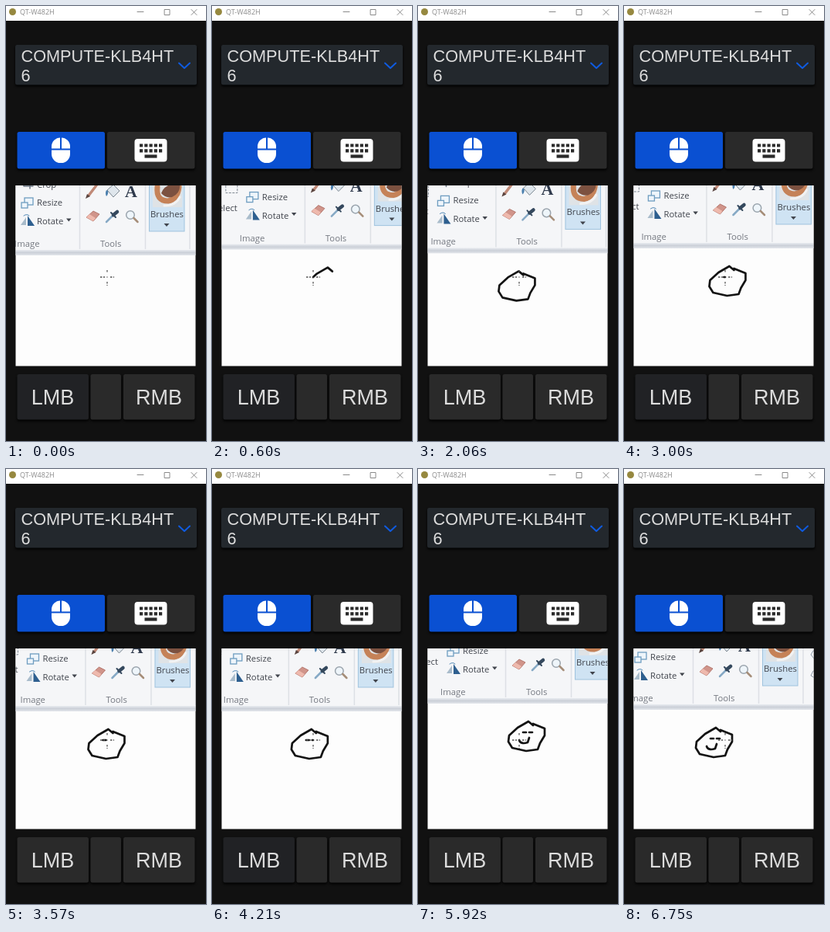
Recreate the animation shown at these times as an HTML page. Size 259x560 px, loop 6.77 s.

```html
<!DOCTYPE html>
<html lang="en">
<head>
<meta charset="utf-8">
<title>Remote mouse</title>
<style>
  html, body { margin: 0; width: 100%; height: 100%; overflow: hidden; background: #111; }
  svg { display: block; width: 100vw; height: 100vh; }
  .ui { font-family: "Liberation Sans", Arial, sans-serif; fill: #dcdcdc; }
  .ribbon { font: 11.3px "Open Sans", "Noto Sans", sans-serif; fill: #41454d; filter: blur(.6px); }
  .group { fill: #747880; }
  .button { fill: #2a2a2a; filter: drop-shadow(0 2px 1.5px #000); }
  .button.on { fill: #0a50d2; }
  .button.held { fill: #212225; }
  .line { fill: none; stroke-linecap: round; stroke-linejoin: round; }
  .ink { stroke: #131313; stroke-width: 2.7; filter: blur(.3px); }
</style>
</head>
<body>
<svg viewBox="0 0 259 560">
  <defs>
    <clipPath id="lens"><rect x="12.500" y="231" width="233" height="232.500"/></clipPath>
    <linearGradient id="edge" x2="0" y2="1">
      <stop offset="0" stop-color="#e8ebf0"/>
      <stop offset=".5" stop-color="#cbd0d8"/>
      <stop offset="1" stop-color="#e3e6eb"/>
    </linearGradient>
  </defs>
  <rect width="259" height="560" fill="#111"/>

  <!-- window bar -->
  <rect width="259" height="19" fill="#fff"/>
  <circle cx="8.500" cy="7.500" r="4.500" fill="#96883f"/>
  <text x="18" y="11" font-family="Open Sans, sans-serif" font-size="9" fill="#8a8a8a">QT-W482H</text>
  <path class="line" stroke="#8a8a8a" d="M170 7.500h8M205.500 4.500h6.500v7h-6.500zM240 4.500l7 7m0-7l-7 7"/>

  <!-- device list -->
  <rect class="button" x="12" y="50" width="235" height="51.500" rx="2.500" style="fill:#23282d"/>
  <g class="ui" font-size="21.7">
    <text x="19.500" y="71.500">COMPUTE-KLB4HT</text>
    <text x="19.500" y="96.500">6</text>
  </g>
  <path class="line" stroke="#0f5be0" stroke-width="2" d="M224 73.500l7 6.500l7-6.500"/>

  <!-- mode buttons -->
  <rect class="button on" x="14.500" y="162" width="113.500" height="47.500" rx="2.500"/>
  <rect class="button" x="131" y="162" width="113.500" height="47.500" rx="2.500"/>
  <rect x="59" y="169.500" width="24" height="32.500" rx="11.500" fill="#fff"/>
  <path d="M59 184.500h24M71 169v15" stroke="#0a50d2" stroke-width="2"/>
  <rect x="166.500" y="171" width="42" height="29.500" rx="4" fill="#fff"/>
  <g stroke="#2a2a2a" stroke-width="4.200">
    <path d="M173 179.500h29.200M173 186.300h29.200" stroke-dasharray="4.200 2.050"/>
    <path d="M179.500 193.500h16"/>
  </g>

  <!-- magnified desktop -->
  <g clip-path="url(#lens)">
    <rect x="12" y="230" width="234" height="234" fill="#fdfdfd"/>
    <g id="desk">
      <g class="ribbon">
        <rect x="-40" y="180" width="340" height="134" fill="#f5f6f8"/>
        <rect x="-40" y="313" width="340" height="7" fill="url(#edge)"/>
        <path d="M95.500 190v122M180.500 190v122M238 190v122" stroke="#dde0e5" stroke-width="1.500"/>
        <text x="8" y="270" text-anchor="end">Select</text>
        <rect x="-7" y="234" width="15" height="13" fill="none" stroke="#7d8791" stroke-dasharray="3 1.500"/>
        <text x="40" y="233">Crop</text>
        <path class="line" stroke="#6b7683" stroke-width="1.500" d="M23 219v12h12M20 223h11v11"/>
        <g fill="#eef5fb" stroke="#6f9dc0" stroke-width="1.300">
          <rect x="24" y="246" width="11" height="9"/>
          <rect x="20" y="252" width="8" height="7"/>
        </g>
        <text x="40" y="256">Resize</text>
        <path d="M26 281h-7l7-10z" fill="#a9bccb"/>
        <path d="M28 269v13h9z" fill="#2e5f8f"/>
        <path class="line" stroke="#4d86b5" d="M23 269q4-3 7 0"/>
        <text x="40" y="280">Rotate</text>
        <path d="M78 272.500h6.500l-3.250 4z"/>
        <g class="group">
          <text x="11" y="309">Image</text>
          <text x="122" y="309">Tools</text>
        </g>

        <!-- drawing tools -->
        <path class="line" stroke="#c08a78" stroke-width="3.500" d="M107 243l10-13"/>
        <path d="M103 247l2-6l4 3z" fill="#5a4540"/>
        <path d="M131 236l8-7l8 8l-8 8z" fill="#dfe6ec" stroke="#7c8791"/>
        <path d="M130 236q-2 4 0 8q3-3 2-7z" fill="#4a7fae"/>
        <text x="154" y="245" font-family="Liberation Serif, serif" font-size="22" font-weight="bold" fill="#2f3a4c">A</text>
        <path d="M104 271l9-8l8 4l-8 9z" fill="#d0948a" stroke="#b4786f"/>
        <path d="M104 271l4-4l8 5l-3 4z" fill="#eeb9ad"/>
        <path class="line" stroke="#86a9c5" stroke-width="2.500" d="M130 277l9-9"/>
        <path class="line" stroke="#34485d" stroke-width="4.500" d="M139 268l5-4"/>
        <path class="line" stroke="#34485d" stroke-width="2" d="M136 265l6 6"/>
        <circle cx="161" cy="268" r="5.300" fill="#eef5fa" stroke="#9aa4ad" stroke-width="1.500"/>
        <path class="line" stroke="#a58d78" stroke-width="2.500" d="M165.500 272l5 5"/>

        <!-- brush picker -->
        <rect x="185.500" y="200" width="45.500" height="89" fill="#cfe3f3" stroke="#9fc3de"/>
        <rect x="190" y="212" width="38" height="46" fill="#dfe3e6"/>
        <path class="line" stroke="#c58258" stroke-width="7" d="M196 232q-2 18 14 18q12-2 14-18"/>
        <path d="M201 240q4-12 24-14q2 14-10 19q-8 2-14-5z" fill="#7c5140"/>
        <path class="line" stroke="#f2f2f2" stroke-width="3" d="M205 256q15 0 20-11"/>
        <text x="187" y="271">Brushes</text>
        <path d="M204.500 279h7l-3.500 4z"/>
        <path class="line" stroke="#8b98a5" d="M256 244h-5l-3 5l4 5M256 270h-5l-3 6l5 3"/>
      </g>

      <!-- drawing, in the order of the pen -->
      <path class="line ink" data-from="80" data-to="1960"
        d="M131 348L125 343L111 351L100 361L99 369L104 377L122 381L137 379L140 371L146 361V352L131 346"/>
      <path class="line ink" data-from="2330" data-to="3220" d="M118 357h4"/>
      <path class="line ink" data-from="3950" data-to="4450" d="M126 357h4"/>
      <path class="line ink" data-from="4950" data-to="5970" d="M126 364L124 370Q115 373 113 367"/>
    </g>
    <path stroke="#555" stroke-width="1.300" stroke-dasharray="2.500 1.500"
      d="M122 349h6M135 349h5M131 340v4M131 355v5M130.500 349h1"/>
  </g>

  <!-- mouse buttons -->
  <rect id="left" class="button" x="14.500" y="474" width="92.500" height="58.500" rx="2.500"/>
  <rect class="button" x="109.500" y="474" width="39.500" height="58.500" rx="2.500"/>
  <rect class="button" x="152" y="474" width="92.500" height="58.500" rx="2.500"/>
  <g class="ui" font-size="27" text-anchor="middle">
    <text x="60.500" y="513">LMB</text>
    <text x="198" y="513">RMB</text>
  </g>
</svg>
<script>
  const LOOP = 6770, STEP = 65;
  const CENTER = { x: 131, y: 349 }, REST = { x: 137, y: 359 };
  const pauses = [[0, 80], [450, 600], [2390, 3000], [3220, 3370], [4040, 4210], [6170, 6490]];

  const clamp = (v, low, high) => Math.min(high, Math.max(low, v));
  const mix = (a, b, k) => ({ x: a.x + (b.x - a.x) * k, y: a.y + (b.y - a.y) * k });

  // Time spent moving, without the pauses
  const busy = t => pauses.reduce((sum, [a, b]) => sum - clamp(t - a, 0, b - a), t);

  const desk = document.getElementById("desk");
  const left = document.getElementById("left");
  const strokes = [...document.querySelectorAll(".ink")].map(path => {
    const length = path.getTotalLength();
    return {
      path, length,
      from: busy(+path.dataset.from), to: busy(+path.dataset.to),
      start: path.getPointAtLength(0), end: path.getPointAtLength(length)
    };
  });
  const finish = { from: busy(6750), start: REST };

  function draw(t) {
    const now = Math.ceil(busy(t) / STEP) * STEP;
    let pointer = CENTER, held = false;
    strokes.forEach(({ path, length, from, to, end }, i) => {
      const k = clamp((now - from) / (to - from), 0, 1);
      path.style.visibility = k > 0 ? "visible" : "hidden";
      path.style.strokeDasharray = `${length * k} ${length + 9}`;
      if (now < from) return;
      held = k < 1;
      const next = strokes[i + 1] || finish;
      pointer = held
        ? path.getPointAtLength(length * k)
        : mix(end, next.start, clamp((now - to) / (next.from - to), 0, 1));
    });
    desk.setAttribute("transform", `translate(${CENTER.x - pointer.x} ${CENTER.y - pointer.y})`);
    left.classList.toggle("held", held);
  }

  const begin = performance.now();
  function tick() {
    draw((performance.now() - begin) % LOOP);
    requestAnimationFrame(tick);
  }
  tick();
</script>
</body>
</html>
```
